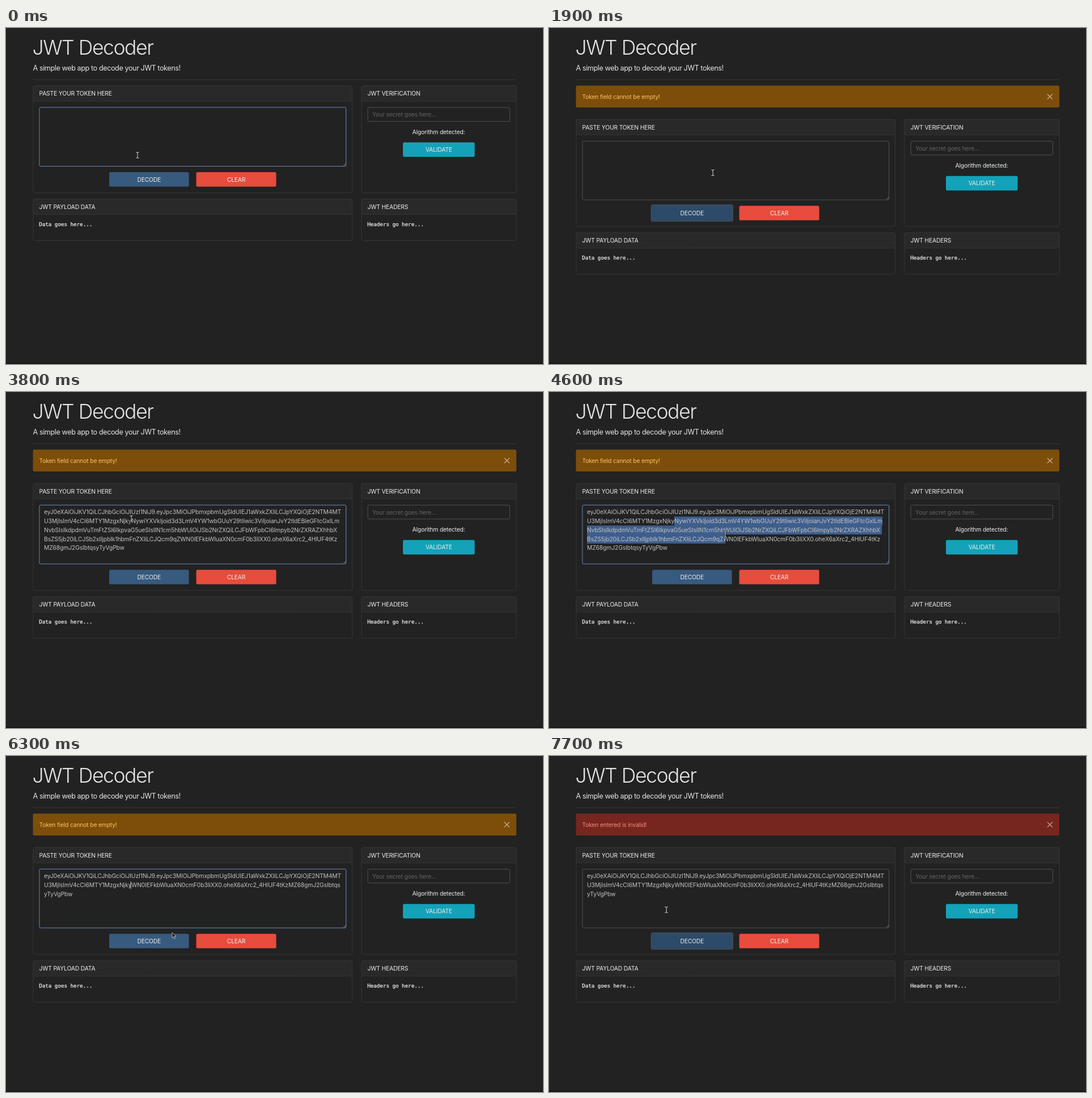
An HTML page for the animation above (8 s loop, 947 px wide and 592 px high).

```html
<!DOCTYPE html>
<html lang="en">
<head>
<meta charset="utf-8">
<title>JWT Decoder</title>
<style>
html, body { margin: 0; width: 100%; height: 100%; overflow: hidden; background: #222; }
svg { display: block; width: 100%; height: 100%; }
text { font: 10.3px Inter, Roboto, sans-serif; font-optical-sizing: none; letter-spacing: -.16px; fill: #eee; white-space: pre; }
text.title { font-size: 35.5px; font-weight: 300; letter-spacing: -1.42px; fill: #e4e4e4; }
text.lead { font-size: 12.6px; letter-spacing: -.4px; fill: #e4e4e4; }
text.mono { font: 9.2px "DejaVu Sans Mono", monospace; letter-spacing: 0; stroke: #eee; stroke-width: .25px; }
text.mid { text-anchor: middle; }
text.hint { fill: #636363; }
#lines text { fill: #c2c2c2; letter-spacing: -.11px; }
.card { fill: #222; stroke: #353535; }
.head { fill: #292929; stroke: #353535; }
.field { fill: #222; stroke: #505050; }
#area.focus { stroke: #677d9f; }
#sel { fill: #3e5e8c; }
</style>
</head>
<body>
<svg viewBox="0 0 947 592">
  <rect width="947" height="592" fill="#222"/>
  <rect y="590" width="947" height="2" fill="#1a1315"/>
  <text class="title" x="46.5" y="47">JWT Decoder</text>
  <text class="lead" x="47.5" y="75">A simple web app to decode your JWT tokens!</text>
  <path d="M48 91H900" stroke="#363636"/>

  <g id="alert">
    <rect id="bar" x="47.5" y="101.5" width="852.5" height="38.5" rx="2.5"/>
    <text id="msg" x="58.5" y="124.7"></text>
    <path d="M878.8 116.4l9 9m0-9l-9 9" stroke="#fff" stroke-opacity=".6" stroke-width="1.3"/>
  </g>

  <g id="page">
    <g id="cards"></g>
    <rect id="glow" x="57.5" y="138.5" width="543.5" height="106.5" rx="3.5" fill="#28313d"/>
    <rect id="area" class="field" x="59" y="140" width="540.5" height="103.5" rx="2.5"/>
    <path d="M595 242.5l4-4m-1.8 4l1.8-1.8" stroke="#8a8a8a" stroke-width=".8"/>
    <path id="sel"/>
    <g id="lines"></g>
    <path id="caret" stroke="#ddd"/>
    <rect class="field" x="638" y="140" width="250.5" height="24.5" rx="2.5"/>
    <text class="hint" x="646" y="156.3">Your secret goes here...</text>
    <text class="mid" x="763" y="187.2">Algorithm detected:</text>
    <rect id="ring" x="179.5" y="251.5" width="145.5" height="30.5" rx="4" fill="#3c4b5b"/>
    <g id="buttons"></g>
  </g>

  <g id="cursor">
    <g id="beam" fill="none" stroke-linecap="round">
      <path d="M-2.6-5.2Q0-5.2 0-3.6Q0-5.2 2.6-5.2M0-4V4M-2.6 5.2Q0 5.2 0 3.6Q0 5.2 2.6 5.2" stroke="#111" stroke-width="2.4"/>
      <path d="M-2.6-5.2Q0-5.2 0-3.6Q0-5.2 2.6-5.2M0-4V4M-2.6 5.2Q0 5.2 0 3.6Q0 5.2 2.6 5.2" stroke="#d4d4d4" stroke-width="1.1"/>
    </g>
    <path id="arrow" d="M0 0V9.4L2.2 7.4L3.7 10.8L5.3 10.1L3.8 6.8H6.7Z" fill="#111" stroke="#ddd" stroke-width=".8"/>
    <path id="hand" d="M-1 1Q0-.8 1 1V4.5Q2-.2 2.6 4.6Q4 3.4 4.4 5.2Q6 4.4 6 6.5Q6 9.5 4.4 12H-1.4Q-3-.2 -5 7Q-5 5-3 6.4L-1 8Z" fill="#eee" stroke="#222" stroke-width=".7"/>
  </g>
</svg>
<script>
const $ = id => document.getElementById(id);
const show = (id, on) => $(id).setAttribute('visibility', on ? 'inherit' : 'hidden');

const LOOP = 8000, SHIFT = 59.3, PITCH = 15.8;
const WARN = 600, FOCUS = 2200, PASTE = 3100, DRAG = 3800, CUT = 5200, FAIL = 6800;

const head = 'U3MjIsImV4cCI6MTY1MzgxNjky';
const tail = 'WN0IEFkbWluaXN0cmF0b3IiXX0.oheX6aXrc2_4HlUF4tKz';
const first = 'eyJ0eXAiOiJKV1QiLCJhbGciOiJIUzI1NiJ9.eyJpc3MiOiJPbmxpbmUgSldUIEJ1aWxkZXIiLCJpYXQiOjE2NTM4MT';
const pasted = [
  first,
  head + 'NywiYXVkIjoid3d3LmV4YW1wbGUuY29tIiwic3ViIjoianJvY2tldEBleGFtcGxlLm',
  'NvbSIsIkdpdmVuTmFtZSI6IkpvaG5ueSIsIlN1cm5hbWUiOiJSb2NrZXQiLCJFbWFpbCI6Impyb2NrZXRAZXhhbX',
  'BsZS5jb20iLCJSb2xlIjpbIk1hbmFnZXIiLCJQcm9qZ' + tail,
  'MZ68gmJ2GsIbtqsyTyVgPbw'
];
const cut = [first, head + tail + 'MZ68gmJ2GsIbtqs', 'yTyVgPbw'];

const card = (x, y, w, h, title, body = '') => `
  <rect class="card" x="${x}" y="${y}" width="${w}" height="${h}" rx="2.5"/>
  <rect class="head" x="${x}" y="${y}" width="${w}" height="27" rx="2.5"/>
  <text x="${x + 10.5}" y="${y + 17.3}">${title}</text>
  <text class="mono" x="${x + 10.2}" y="${y + 47.4}">${body}</text>`;
$('cards').innerHTML =
  card(48, 102, 562.5, 188.5, 'PASTE YOUR TOKEN HERE') +
  card(627, 102, 273, 188.5, 'JWT VERIFICATION') +
  card(48, 301.5, 562.5, 73, 'JWT PAYLOAD DATA', 'Data goes here...') +
  card(627, 301.5, 273, 73, 'JWT HEADERS', 'Headers go here...');

const button = (id, x, y, w, color, label) => `
  <rect id="${id}" x="${x}" y="${y}" width="${w}" height="25.5" rx="2.5" fill="${color}"/>
  <text class="mid" x="${x + w / 2}" y="${y + 16.6}">${label}</text>`;
$('buttons').innerHTML =
  button('decode', 182, 254, 140.5, '#375a7f', 'DECODE') +
  button('clear', 335.5, 254, 141, '#e74c3c', 'CLEAR') +
  button('validate', 700, 201.5, 126.5, '#14a2b8', 'VALIDATE');

// pointer path: time, x, y
const path = [
  [0, 232, 224], [100, 232, 224], [450, 241, 271], [1450, 241, 271], [1900, 289, 255],
  [3350, 289, 255], [3800, 221, 223], [4600, 311, 251], [5850, 311, 251],
  [6300, 293, 311], [6600, 291, 322], [7350, 291, 322], [7700, 207, 271], [LOOP, 207, 271]
];

function pointer(t) {
  const i = path.findIndex(p => p[0] > t);
  const [t0, x0, y0] = path[i - 1], [t1, x1, y1] = path[i];
  const k = (t - t0) / (t1 - t0), e = k * k * (3 - 2 * k);
  return [x0 + (x1 - x0) * e, y0 + (y1 - y0) * e];
}

let shown;
function setLines(lines) {
  if (lines === shown) return;
  shown = lines;
  $('lines').innerHTML = lines.map((s, i) => `<text x="67" y="${156 + i * PITCH}">${s}</text>`).join('');
}

// selected rows from the drag start to the pointer, in page coordinates
function selection(x, y) {
  const row = y < 235.5 ? 1 : y < 250.5 ? 2 : 3;
  const ends = [0, 588, 587];
  let d = '';
  for (let r = 1; r <= row; r++) {
    const a = r === 1 ? 221 : 67, b = r === row ? x : ends[r];
    d += `M${a} ${144.4 + r * PITCH}H${b}v${PITCH}H${a}z`;
  }
  return d;
}

function caretAt(t) {
  if (t >= 2300 && t < 2700) return [68, 0];
  if (t >= PASTE && t < 3500) return [210, 4];
  if (t >= CUT && t < 5500 || t >= 5900 && t < 6500) return [220, 1];
}

function draw(now) {
  const t = now % LOOP, [x, y] = pointer(t);
  const alerting = t >= WARN, failed = t >= FAIL, off = alerting ? SHIFT : 0;
  const typing = t < 450 || t >= FOCUS && t < FAIL;
  const pressed = t >= 450 && t < FOCUS || failed;

  $('page').setAttribute('transform', `translate(0 ${off})`);
  show('alert', alerting);
  $('bar').setAttribute('fill', failed ? '#76261e' : '#7d4e09');
  $('msg').style.fill = failed ? '#ee8c81' : '#fbc265';
  $('msg').textContent = failed ? 'Token entered is invalid!' : 'Token field cannot be empty!';

  show('glow', typing);
  $('area').classList.toggle('focus', typing);
  setLines(t < PASTE ? [] : t < CUT ? pasted : cut);

  const selecting = t > DRAG && t < CUT;
  show('sel', selecting);
  if (selecting) $('sel').setAttribute('d', selection(x, y));

  const caret = caretAt(t);
  show('caret', caret);
  if (caret) $('caret').setAttribute('d', `M${caret[0]} ${146 + caret[1] * PITCH}v13`);

  const hand = y >= 254 + off, beam = y <= 243.5 + off;
  show('ring', pressed);
  $('decode').setAttribute('fill', pressed || hand ? '#2c4a69' : '#375a7f');
  show('hand', hand);
  show('beam', beam);
  show('arrow', !hand && !beam);
  $('cursor').setAttribute('transform', `translate(${x} ${y})`);
}

const start = performance.now();
function tick() {
  draw(performance.now() - start);
  requestAnimationFrame(tick);
}
tick();
</script>
</body>
</html>
```
